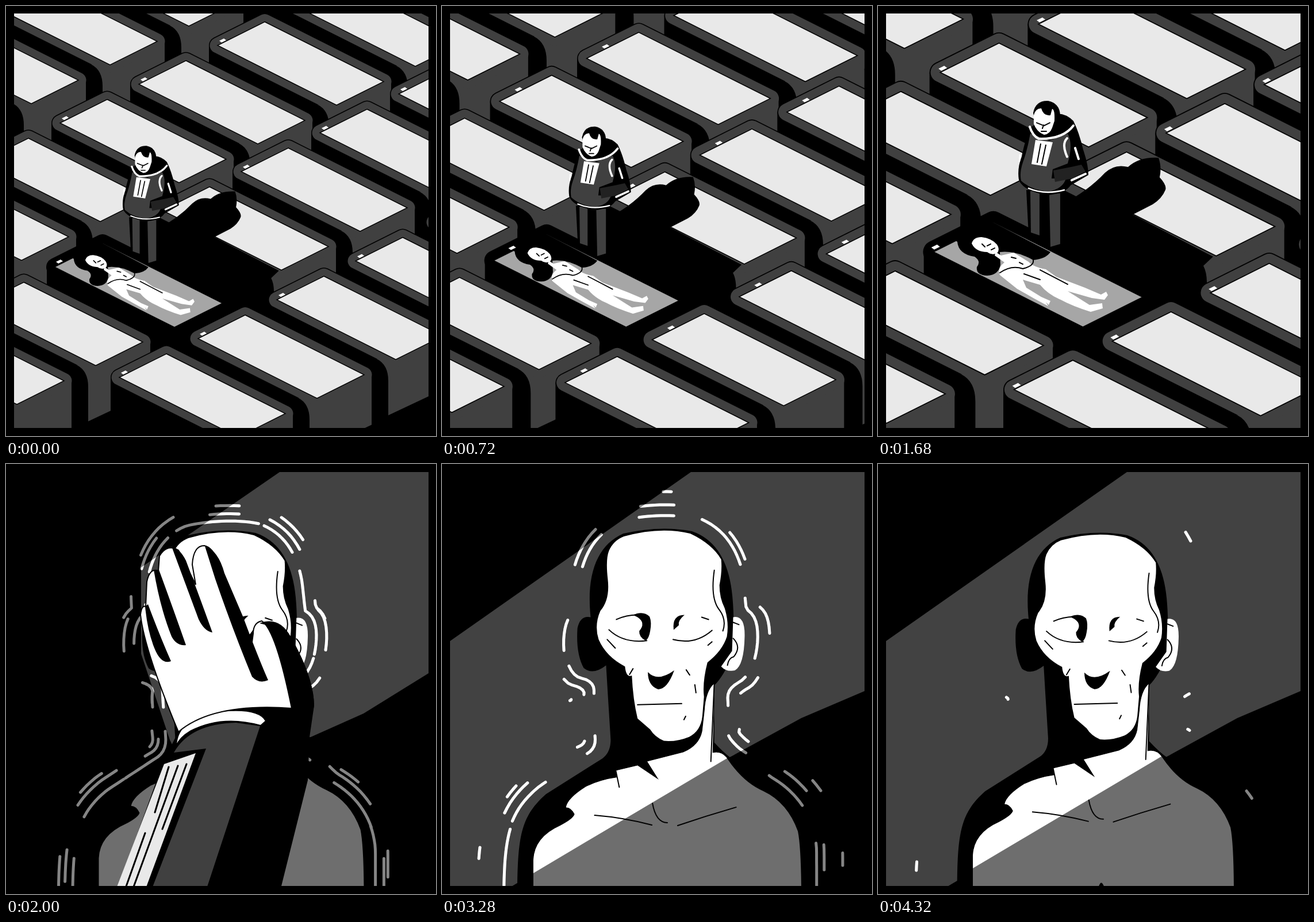
An HTML page for the animation above (4400 ms loop, 748 px wide and 748 px high).

```html
<!DOCTYPE html>
<html lang="en">
<head>
<meta charset="utf-8">
<title>Vault</title>
<style>
html, body { margin: 0; width: 100%; height: 100%; overflow: hidden; background: #000; }
svg { display: block; width: 100vw; height: 100vh; }
.line { fill: none; stroke: #000; stroke-width: 2; stroke-linecap: round; }
.aura { fill: none; stroke-width: 5; stroke-linecap: round; stroke-linejoin: round; }
</style>
</head>
<body>
<svg id="stage" viewBox="0 0 748 748"></svg>
<script>
const LOOP = 4400, STEP = 80, CUT = 1760;
const LID = '#e9e9e9', SIDE = '#404040', WALL = '#424242', SKIN = '#6e6e6e', PANEL = '#a6a6a6';
const stage = document.getElementById('stage');
const clamp = v => Math.max(0, Math.min(1, v));
const smooth = v => { v = clamp(v); return v * v * (3 - 2 * v); };
const shape = (d, fill = '#000', extra = '') => `<path d="${d}" fill="${fill}" ${extra}/>`;
const line = (d, extra = '') => `<path class="line" d="${d}" ${extra}/>`;

// Vaults: each one is placed by the top corner of its lid
const lidPath = 'M0 0L207 104L125 145L-82 41Z';
const rim = (color, width) => shape(lidPath, color, `stroke="${color}" stroke-width="${width}" stroke-linejoin="round"`);

function vault(x, y, open) {
  const body = shape('M-97 41V128L121 245L221 193V104L125 145Z');
  const closed = rim('#000', 30) +
    shape('M92 144Q112 154 112 182V242L220 191V104L125 145Z', SIDE) + rim(SIDE, 27) +
    shape(lidPath, LID, 'stroke="#000" stroke-width="1.4"') +
    '<path class="lamp" d="M-79 33L-71 29L-67 32L-75 36Z" fill="#fff"/>';
  const opened = rim('#000', 32) + shape(lidPath, PANEL) +
    '<path class="lamp" d="M-81 32L-73 28L-69 31L-77 35Z" fill="#fff"/>';
  return `<g transform="translate(${x} ${y})">${body}${open ? opened : closed}</g>`;
}

function row(x, y, count, openIndex = -1) {
  let out = '';
  for (let i = 0; i < count; i++) out += vault(x - 137 * i, y + 67.5 * i, i === openIndex);
  return out;
}

// Figures are drawn at the closest zoom
const close = content =>
  `<g transform="translate(36 560) scale(.802) translate(-36 -560)">${content}</g>`;

const castShadow = shape('M300 350L320 345Q365 322 395 290Q412 274 435 280Q455 262 488 264Q494 280 490 298Q503 312 500 320Q494 335 478 345L443 363L583 436L566 452V500L540 520L460 500L270 430Z');

const sleeper =
  shape('M134 408L196 374L300 428Q292 440 270 442Q240 425 212 428L213 450Q210 468 190 469Q170 468 172 454Q180 444 168 436Q140 432 138 410Z') +
  shape('M163 413Q166 402 180 402Q198 404 207 415Q213 424 207 430Q198 434 190 428Q170 428 163 413Z', '#fff') +
  line('M181 414L186 419M190 417L196 414M197 424L203 421') +
  shape('M205 428L214 434L236 429L262 445Q270 454 292 458L310 471L360 490L388 502L397 497L400 503L394 511L372 508L330 496L368 520L390 517L391 526L370 532Q338 522 318 511Q296 502 282 485L252 476L258 490L284 506L300 513L297 520L292 515L296 522L272 509L242 492L212 468Q207 456 220 446L203 434Z', '#fff') +
  line('M212 464Q232 450 252 457Q272 452 270 442M232 437L240 439M246 446L252 449M254 466L282 476M282 459L330 484');

const visitor =
  shape('M258 320L326 318L322 420L300 424L262 398Z') +
  shape('M265 322H281V399L266 394Z', SIDE) + shape('M298 326H317V414L300 419Z', SIDE) +
  shape('M264 212Q254 240 250 262Q242 282 245 302Q252 322 296 329Q326 326 335 312L366 294Q366 276 357 250Q350 220 340 200Q322 182 300 190Z') +
  shape('M265 222Q260 250 252 272Q246 290 249 304Q266 320 296 323Q322 318 327 300L302 300L304 284L330 274Q340 240 330 222L298 234Z', SIDE) +
  shape('M305 286L336 280L354 276L361 288L338 300L308 306Z', '#222') +
  shape('M274 233L304 237L293 279L267 275Z', '#fff') +
  line('M283 240L277 272M292 242L285 275', 'stroke-width="1.5"') +
  '<g class="line" style="stroke:#fff;stroke-width:4"><path d="M264 210Q269 226 280 231Q322 232 340 208"/><path d="M329 230Q319 240 329 262M343 247L349 266M337 303L361 292"/><path d="M247 259L246 270M262 317Q290 329 324 320" style="stroke-width:2.5"/></g>' +
  shape('M270 186Q274 164 296 165Q316 169 317 190L309 214L290 223L276 214Z') +
  shape('M271 190Q274 178 284 178Q288 192 300 190L303 179Q308 180 307 200L303 212Q299 223 289 224Q276 219 271 205Z', '#fff') +
  line('M276 203L286 207M289 208L299 203M284 218H293M288 207L286 213');

const hall = row(193, -110, 3) + row(587, -40, 6) + row(765, 112, 4) + close(castShadow) +
  row(168, 413, 3, 0) + close(sleeper + visitor) + row(827, 335, 5);

// Portrait
const silhouette = 'M130 760C130 650 135 615 180 575L275 515Q293 505 293 480L288 400L285 350Q262 368 246 355Q232 330 235 285Q240 262 258 266C250 190 270 140 315 120Q380 105 435 116Q490 135 503 210Q510 250 507 330Q490 370 474 385V485Q497 510 515 520L626 640V760Z';
const chest = 'M158 760V690Q160 650 205 630Q228 618 230 610Q224 598 215 598Q218 582 250 562Q275 550 304 546L302 534L340 525L377 550L357 518L420 502Q448 490 453 465L457 430Q459 395 474 382L471 503Q488 499 498 515Q525 555 560 570Q602 590 620 640Q626 670 626 760Z';
const face = 'M316 125Q380 107 432 120Q470 138 486 165Q488 185 483 210Q483 232 492 250Q500 275 496 300Q488 325 462 345Q453 380 456 405L453 440Q450 465 430 475Q408 484 386 482Q370 475 362 462L340 443Q332 410 330 368Q320 372 318 352Q285 335 272 305Q264 280 275 255Q292 235 288 200Q284 165 290 150Q298 132 316 125Z';
const features =
  shape('M332 262Q350 254 361 265Q365 275 362 290Q360 303 354 307Q342 300 343 290Q355 276 340 266Z') +
  shape('M403 288Q400 262 422 262Q410 272 412 280Z') +
  shape('M358 362Q375 380 404 359Q392 392 376 392Q358 386 358 362Z') +
  line('M303 270Q320 262 340 262M290 288Q315 312 356 307M452 266L464 270M402 305Q440 315 470 289M287 305L301 320M470 309L463 315M326 366L332 356M340 419L417 417M425 358L431 367M440 384L442 398M424 439L421 445M474 184Q467 232 482 252Q496 270 489 290') +
  shape('M507 266Q528 262 527 300Q526 350 510 359Q495 362 486 352L505 325Z', '#fff') +
  line('M507 303Q522 318 508 335Q499 337 497 350M507 275L517 279');
const bust = shape(silhouette) + shape(chest, SKIN) +
  `<g clip-path="url(#beamClip)">${shape(chest, '#fff')}</g>` +
  line('M302 534L308 563M265 612Q315 616 365 629M410 630Q460 613 512 598M366 591Q372 625 392 625M474 380L468 518') +
  shape(face, '#fff') + features + shape('M383 748Q388 730 394 748Z');

const arm =
  shape('M436 280Q470 262 495 300Q535 370 536 420L528 475L525 550L465 790H175L275 515L300 465Z') +
  shape('M292 502Q320 452 400 450L442 456L332 790H234L348 495Z', SIDE) +
  shape('M275 522L330 503L224 790H172Z', LID) +
  line('M283 527L259 606M299 525L213 760M314 522L272 635M242 642L200 760', 'style="stroke-width:3"') +
  shape('M296 490Q298 440 375 430Q440 424 452 447L443 455Q375 436 320 465Q303 475 296 490Z', '#fff', 'stroke="#000" stroke-width="2"') +
  shape('M300 466C285 430 240 320 234 262Q236 245 243 248L245 205Q250 180 265 186L267 160Q280 138 300 150L330 210L324 175Q326 142 345 142Q360 145 368 170L428 310L430 295Q430 276 445 273Q470 290 497 425Q360 415 300 466Z', '#fff', 'stroke="#000" stroke-width="2"') +
  shape('M242 248L247 244Q268 300 287 343Q270 350 258 320Q246 290 242 248Z') +
  shape('M257 184L266 184Q292 255 313 315Q297 317 288 300Q268 250 257 184Z') +
  shape('M289 146Q302 146 313 168Q340 240 359 293Q345 291 335 270Z') +
  shape('M346 143Q369 150 380 190L412 265Q440 340 456 376Q440 383 428 370Q395 290 364 200Z') +
  shape('M441 277Q475 264 495 300Q535 370 536 420L530 450L497 425Q480 310 460 282Z');

stage.innerHTML = `
  <defs>
    <clipPath id="frame"><rect x="14" y="13" width="721" height="721"/></clipPath>
    <clipPath id="beamClip"><polygon class="beam"/></clipPath>
    <path id="contour" d="M122 760C122 650 130 612 180 572L262 518Q284 506 284 480L278 385Q274 366 250 362Q232 355 230 325Q226 275 250 260C246 190 265 135 315 114Q380 100 438 110Q495 130 508 205L514 258Q535 268 533 305Q530 352 508 368Q484 380 482 400V480Q500 508 522 518L560 556Q630 595 636 670V760"/>
  </defs>
  <rect width="748" height="748"/>
  <g clip-path="url(#frame)">
    <g id="hall">${hall}</g>
    <g id="portrait">
      <polygon class="beam" fill="${WALL}"/>
      <path class="aura" stroke="#858585"/>
      <g clip-path="url(#beamClip)"><path class="aura" stroke="#fff"/></g>
      <g id="bust">${bust}</g>
      <g id="arm">${arm}</g>
    </g>
  </g>`;

const find = id => document.getElementById(id);
const all = selector => [...stage.querySelectorAll(selector)];
const parts = { hall: find('hall'), portrait: find('portrait'), bust: find('bust'), arm: find('arm') };
const lamps = all('.lamp'), beams = all('.beam'), auras = all('.aura');

// Evenly spaced points along the contour with softened outward normals
const contour = find('contour');
const GAP = 8, REACH = 38;
const samples = [];
for (let s = 0; s < contour.getTotalLength(); s += GAP) {
  const p = contour.getPointAtLength(s);
  const a = contour.getPointAtLength(s - REACH), b = contour.getPointAtLength(s + REACH);
  const size = Math.hypot(b.x - a.x, b.y - a.y) || 1;
  samples.push({ x: p.x, y: p.y, nx: (b.y - a.y) / size, ny: (a.x - b.x) / size });
}

function random(seed) {
  const v = Math.sin(seed * 12.9898) * 43758.5453;
  return v - Math.floor(v);
}

const births = [1600, 1720, 1960, 2560, 2840, 3100, 3320, 3560];
const WAVE_LIFE = 980, DASHES = 13;

// Waves leave the body as long strokes, then thin out into short dashes
function auraPath(t) {
  let d = '';
  const slot = samples.length / DASHES;
  births.forEach((birth, wave) => {
    const age = t - birth;
    if (age < 0 || age > WAVE_LIFE) return;
    const left = 1 - age / WAVE_LIFE;
    for (let i = 0; i < DASHES; i++) {
      const seed = wave * 31 + i * 7 + 1;
      if (random(seed + 3) > .25 + 1.2 * left) continue;
      const span = Math.max(1.5, slot * left ** 1.6 * (.5 + .75 * random(seed)));
      const middle = (i + .3 + .4 * random(seed + 1)) * slot;
      const offset = 4 + age * (.05 + .03 * random(seed + 2));
      const count = Math.ceil(span);
      for (let k = 0; k <= count; k++) {
        const place = middle + (k / count - .5) * span;
        const index = Math.max(0, Math.min(samples.length - 2, Math.floor(place)));
        const f = clamp(place - index), p = samples[index], q = samples[index + 1];
        const at = (axis, normal) => (p[axis] + (q[axis] - p[axis]) * f
          + offset * (p[normal] + (q[normal] - p[normal]) * f)).toFixed(1);
        d += (k ? 'L' : 'M') + at('x', 'nx') + ' ' + at('y', 'ny');
      }
    }
  });
  return d;
}

function drawHall(t) {
  const zoom = 1 + t * 1.468e-4;
  parts.hall.setAttribute('transform', `translate(36 560) scale(${zoom}) translate(-36 -560)`);
  const slide = 21 * Math.sin(t / 3100 * 2 * Math.PI);
  lamps.forEach(lamp => lamp.setAttribute('transform', `translate(${slide} ${-slide / 2})`));
}

function drawPortrait(t) {
  const shade = 1 - smooth((t - 2160) / 480);
  const mix = (lit, dark) => lit + (dark - lit) * shade;
  const beam = [[mix(433, 476), 14], [735, 14], [735, mix(395, 364)],
    [mix(625, 622), mix(442, 434)], [mix(497, 530), mix(512, 475)],
    [mix(158, 290), mix(713, 490)], [mix(14, 285), mix(798, 480)],
    [mix(14, 235), mix(500, 330)], [mix(14, 235), mix(308, 180)]];
  beams.forEach(b => b.setAttribute('points', beam.join(' ')));

  const depth = t < 2950 ? .0095 : .015;
  const scale = 1 - depth * (1 - Math.cos((t - 2950) / 1370 * Math.PI));
  parts.bust.setAttribute('transform', `translate(392 385) scale(${scale}) translate(-392 -385)`);

  const pull = clamp((t - 2080) / 560) ** 2;
  parts.arm.setAttribute('transform', `translate(${-230 * pull} ${640 * pull})`);
  parts.arm.style.display = pull < 1 ? '' : 'none';

  const d = auraPath(t);
  auras.forEach(a => a.setAttribute('d', d));
}

function draw(now) {
  const t = Math.floor(now % LOOP / STEP) * STEP;
  const inHall = t < CUT;
  parts.hall.style.display = inHall ? '' : 'none';
  parts.portrait.style.display = inHall ? 'none' : '';
  if (inHall) drawHall(t); else drawPortrait(t);
}

const start = performance.now();
function tick() {
  draw(performance.now() - start);
  requestAnimationFrame(tick);
}
tick();
</script>
</body>
</html>
```
